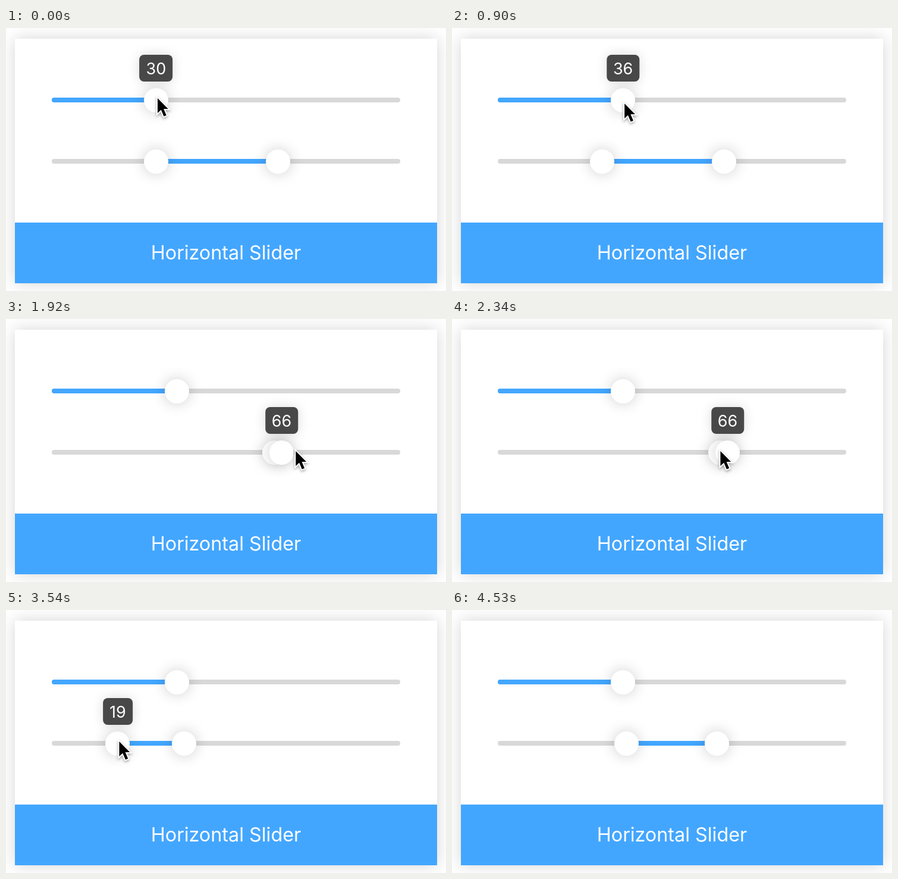
An HTML page that plays this animation: 740 by 442 pixels, repeating every 4800 ms.

```html
<!DOCTYPE html>
<html lang="en">
<head>
<meta charset="utf-8">
<title>Horizontal Slider</title>
<style>
  html, body { margin: 0; width: 100%; height: 100%; overflow: hidden; background: #fff; }
  #stage { position: relative; width: 740px; height: 442px; overflow: hidden; font-family: Inter, "Open Sans", sans-serif; color: #fff; }
  #stage * { position: absolute; box-sizing: border-box; }
  .card { left: 15px; top: 18px; width: 710px; height: 411px; background: #fff; box-shadow: 0 0 26px rgba(0, 0, 0, .17); }
  .title { left: 0; bottom: 0; width: 100%; height: 102px; background: #43a6fe; font-size: 32.3px; line-height: 102px; text-align: center; }
  .slider { left: 76.5px; width: 586.5px; height: 8px; border-radius: 4px; background: #d8d8d8; }
  .fill { height: 8px; background: #43a6fe; border-radius: 4px; }
  .thumb { top: -16.5px; width: 41px; height: 41px; margin-left: -20.5px; border-radius: 50%; background: #fff; box-shadow: 0 0 25px rgba(0, 0, 0, .2); }
  .tip { top: -72px; height: 45px; padding: 0 11px; border-radius: 8px; transform: translateX(-50%); background: #484848; box-shadow: 0 0 20px rgba(0, 0, 0, .14); font-size: 27px; line-height: 47px; z-index: 3; }
  #stage #cursor { left: 0; top: 0; z-index: 4; overflow: visible; filter: drop-shadow(0 2px 2px rgba(0, 0, 0, .35)); }
</style>
</head>
<body>
<div id="stage">
  <div class="card"><div class="title">Horizontal Slider</div></div>
  <div class="slider" id="single" style="top:117px">
    <div class="fill"></div><div class="thumb"></div><div class="tip"></div>
  </div>
  <div class="slider" id="range" style="top:220px">
    <div class="fill"></div><div class="thumb"></div><div class="thumb"></div><div class="tip"></div>
  </div>
  <svg id="cursor" width="20" height="32">
    <path d="M0 0V25L5.8 19.5L10.5 30.5L14.8 28.7L10.2 18H17.8Z" stroke="#fff" stroke-width="4" paint-order="stroke"/>
  </svg>
</div>
<script>
const LOOP = 4800, UNIT = 5.865, LEAD = 14;
const single = document.getElementById("single");
const range = document.getElementById("range");
const cursor = document.getElementById("cursor");

const clamp = (x, low, high) => Math.min(high, Math.max(low, x));

// Chains eased moves: each one starts from wherever the previous one ended.
function glide(t, value) {
  return {
    to(target, start, end) {
      const p = clamp((t - start) / (end - start), 0, 1);
      return glide(t, value + (target - value) * p * p * (3 - 2 * p));
    },
    value
  };
}

// Horizontal pointer place, in slider values.
const hand = t => glide(t, 30)
  .to(89, 30, 470).to(36, 500, 890)
  .to(30, 1110, 1620)
  .to(89, 1710, 2075).to(38, 2110, 2600)
  .to(67, 2760, 3060)
  .to(19, 3090, 3540).to(63, 3600, 4020)
  .to(90, 4290, 4500).value;

const handY = t => glide(t, 118)
  .to(127, 330, 890)
  .to(222, 1110, 1620)
  .to(208, 2760, 3000).to(221, 3000, 3090)
  .to(448, 4290, 4500).value;

// Value left by a drag that lasts from start to end.
const dragged = (t, start, end) => Math.round(hand(clamp(t, start, end)));
const tipOpacity = (t, start, end) => t < start ? 0 : clamp((end - t) / 60, 0, 1);

function show(slider, values, active, opacity) {
  const thumbs = slider.querySelectorAll(".thumb");
  values.forEach((value, i) => {
    thumbs[i].style.left = value * UNIT + "px";
    thumbs[i].style.zIndex = i === active ? 2 : 1;
  });
  const from = values.length > 1 ? Math.min(...values) : 0;
  const fill = slider.querySelector(".fill"), tip = slider.querySelector(".tip");
  fill.style.left = from * UNIT + "px";
  fill.style.width = (Math.max(...values) - from) * UNIT + "px";
  tip.textContent = values[active];
  tip.style.left = values[active] * UNIT + "px";
  tip.style.opacity = opacity;
}

function draw(t) {
  show(single, [dragged(t, 0, 890)], 0, tipOpacity(t, 0, 980));

  // Each handle shifts slightly when the other one passes it.
  const first = t < 3785 ? dragged(t, 1710, 2640) : 37;
  const second = t < 1915 ? 65 : t < 2345 ? 64 : dragged(t, 3090, 4020);
  const active = t < 3090 ? 0 : 1;
  const opacity = active ? tipOpacity(t, 3090, 4080) : tipOpacity(t, 1710, 2720);
  show(range, [first, second], active, opacity);

  const x = 79 + hand(t + LEAD) * UNIT;
  cursor.style.transform = `translate(${x}px, ${handY(t)}px)`;
}

const began = performance.now();
function tick() {
  draw((performance.now() - began) % LOOP);
  requestAnimationFrame(tick);
}
tick();
</script>
</body>
</html>
```
